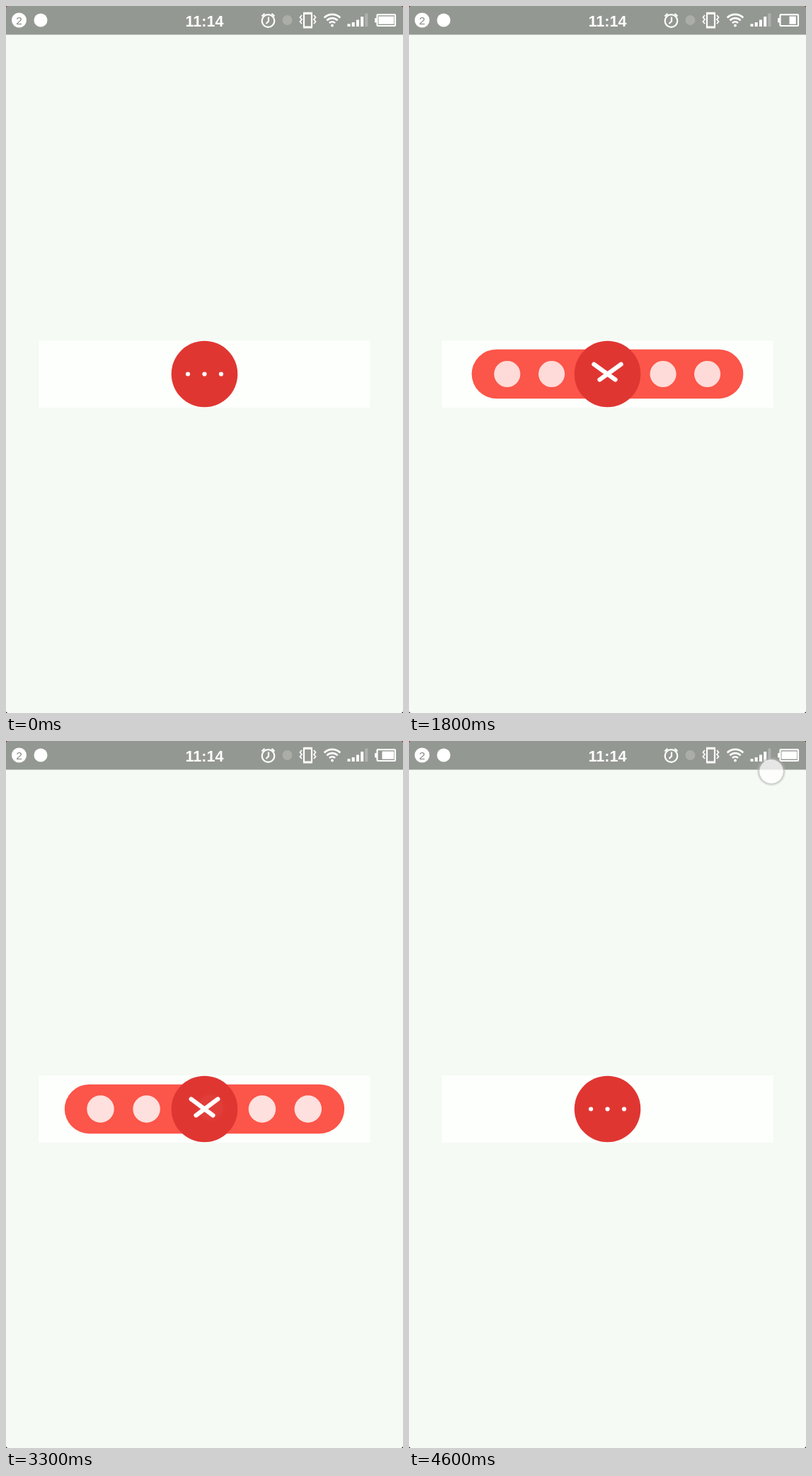
Animation of 561x998 px, one loop 4700 ms. Source, as an HTML page:

```html
<!DOCTYPE html>
<html lang="en">
<head>
<meta charset="utf-8">
<title>Expanding menu</title>
<style>
  html, body { margin: 0; width: 100%; height: 100%; overflow: hidden; background: #f5faf4; }
  svg { display: block; width: 561px; height: 998px; }
  text { font-family: "Liberation Sans", Arial, sans-serif; text-anchor: middle; }
</style>
</head>
<body>
<svg viewBox="0 0 561 998">
  <defs>
    <radialGradient id="press">
      <stop offset="0" stop-color="#fff" stop-opacity=".76"/>
      <stop offset=".78" stop-color="#fff" stop-opacity=".76"/>
      <stop offset=".82" stop-color="#b4b6b4" stop-opacity=".7"/>
      <stop offset="1" stop-color="#b4b6b4" stop-opacity="0"/>
    </radialGradient>
  </defs>

  <rect width="561" height="998" fill="#f5faf4"/>
  <rect x="46" y="472" width="469" height="95" fill="#fcfffb"/>

  <rect width="561" height="40.5" fill="#949892"/>
  <path d="M0 0h2l-2 2zM561 0h-2l2 2z" fill="#a8201c"/>
  <path d="M0 998h2l-2 -2zM561 998h-2l2 -2z" fill="#222"/>

  <circle cx="18.5" cy="20" r="10.5" fill="#fff"/>
  <text x="18.5" y="25.5" font-size="15.5" fill="#858983">2</text>
  <circle cx="49" cy="20" r="9.5" fill="#fff"/>
  <text x="280.5" y="28.7" font-size="21.5" font-weight="bold" fill="#fff">11:14</text>

  <g fill="none" stroke="#fff" stroke-width="2.2">
    <circle cx="370.5" cy="21" r="8.8"/>
    <path d="M371 15.5v6l-3.5 3.5M361.5 14.5l4 -3.7M379.5 14.5l-4 -3.7"/>
    <rect x="421" y="10.5" width="11" height="19.5" rx="1"/>
    <path d="M420 10.2h13M420 30h13" stroke-width="3"/>
    <path d="M418 13l-2.5 3 2.5 3 -2.5 3 2.5 3M435 13l2.5 3 -2.5 3 2.5 3 -2.5 3" stroke-width="1.8"/>
    <path d="M449.7 16.5a16 16 0 0 1 22.6 0M453.4 20.3a10.7 10.7 0 0 1 15.2 0M457 24a5.6 5.6 0 0 1 8 0" stroke-width="2.6"/>
    <rect x="524.5" y="12.2" width="25.5" height="15.8" rx="1"/>
  </g>
  <circle cx="397.5" cy="20" r="7" fill="#aaada8"/>
  <g fill="#fff">
    <circle cx="461" cy="27.5" r="1.9"/>
    <path d="M482.5 25.3h4v3.7h-4zM488.7 23h4v6h-4zM495 19.5h4v9.5h-4zM501.2 15h4v14h-4z"/>
    <path d="M507.3 10.5h4v18.5h-4z" opacity=".25"/>
    <rect x="521" y="17" width="3" height="6.4" rx="1"/>
    <rect id="charge" y="14.6" height="11"/>
  </g>

  <rect id="bar" y="484.7" height="69.5" rx="34.75" fill="#fc5549"/>
  <g id="items" fill="#fff"></g>
  <circle cx="280.5" cy="519.5" r="46.8" fill="#e03632"/>
  <g transform="translate(280.5 519.5)" stroke="#fff" stroke-width="6.2" stroke-linecap="round">
    <path id="leftArm"/>
    <path id="rightArm"/>
    <path d="M0 0h.01"/>
  </g>
  <circle id="touch" r="21" fill="url(#press)"/>
</svg>

<script>
const LOOP = 4700, STEP = 100, CENTER = 280.5, MORPH = 600;
const OPEN_AT = 1382, CLOSE_AT = 3132;
const ITEM_OFFSETS = [-179.5, -100, 99.5, 178.7];
const CHARGE = [[0, 526.5], [1000, 540], [1600, 537.5], [2100, 534.5], [2700, 531.5], [3400, 526.5]];
const TOUCHES = [
  { x: 280.5, y: 519.5, down: 1200, up: 1345 },
  { x: 289, y: 517, down: 2950, up: 3110 },
  { x: 512, y: 43, down: 4600, up: LOOP }
];
const FADE = 200;

const byId = id => document.getElementById(id);
const clamp = v => Math.min(1, Math.max(0, v));
const ease = v => (1 - Math.cos(Math.PI * clamp(v))) / 2;

function set(el, attrs) {
  for (const key in attrs) el.setAttribute(key, attrs[key]);
}

const items = ITEM_OFFSETS.map(() => {
  const dot = document.createElementNS("http://www.w3.org/2000/svg", "circle");
  return byId("items").appendChild(dot);
});

function drawMenu(t) {
  const open = ease((t - OPEN_AT) / MORPH) - ease((t - CLOSE_AT) / MORPH);
  const half = 34.75 + (233.75 - 34.75) * open;
  set(byId("bar"), { x: CENTER - half, width: 2 * half });
  items.forEach((dot, i) => set(dot, {
    cx: CENTER + ITEM_OFFSETS[i] * open, cy: 519.5, r: 23.5 * open, opacity: open
  }));
  // Each outer dot stretches into a line while turning about the centre.
  const length = 47 * open + 0.01;
  set(byId("leftArm"), { d: `M-23.5 0h${length}`, transform: `rotate(${45 * open})` });
  set(byId("rightArm"), { d: `M23.5 0h${-length}`, transform: `rotate(${-45 * open})` });
}

function drawTouch(t) {
  const touch = TOUCHES.find(p => t >= p.down && t < p.up + FADE);
  set(byId("touch"), touch
    ? { cx: touch.x, cy: touch.y, opacity: clamp(1 - (t - touch.up) / FADE) }
    : { opacity: 0 });
}

function drawCharge(t) {
  const left = CHARGE.filter(([start]) => t >= start).pop()[1];
  const right = left > 533 ? 546.8 : 548.2;
  set(byId("charge"), { x: left, width: right - left });
}

function render(now) {
  const t = Math.floor((now % LOOP) / STEP) * STEP;
  drawMenu(t);
  drawTouch(t);
  drawCharge(t);
}

const begin = performance.now();
function tick() {
  render(performance.now() - begin);
  requestAnimationFrame(tick);
}
tick();
</script>
</body>
</html>
```
